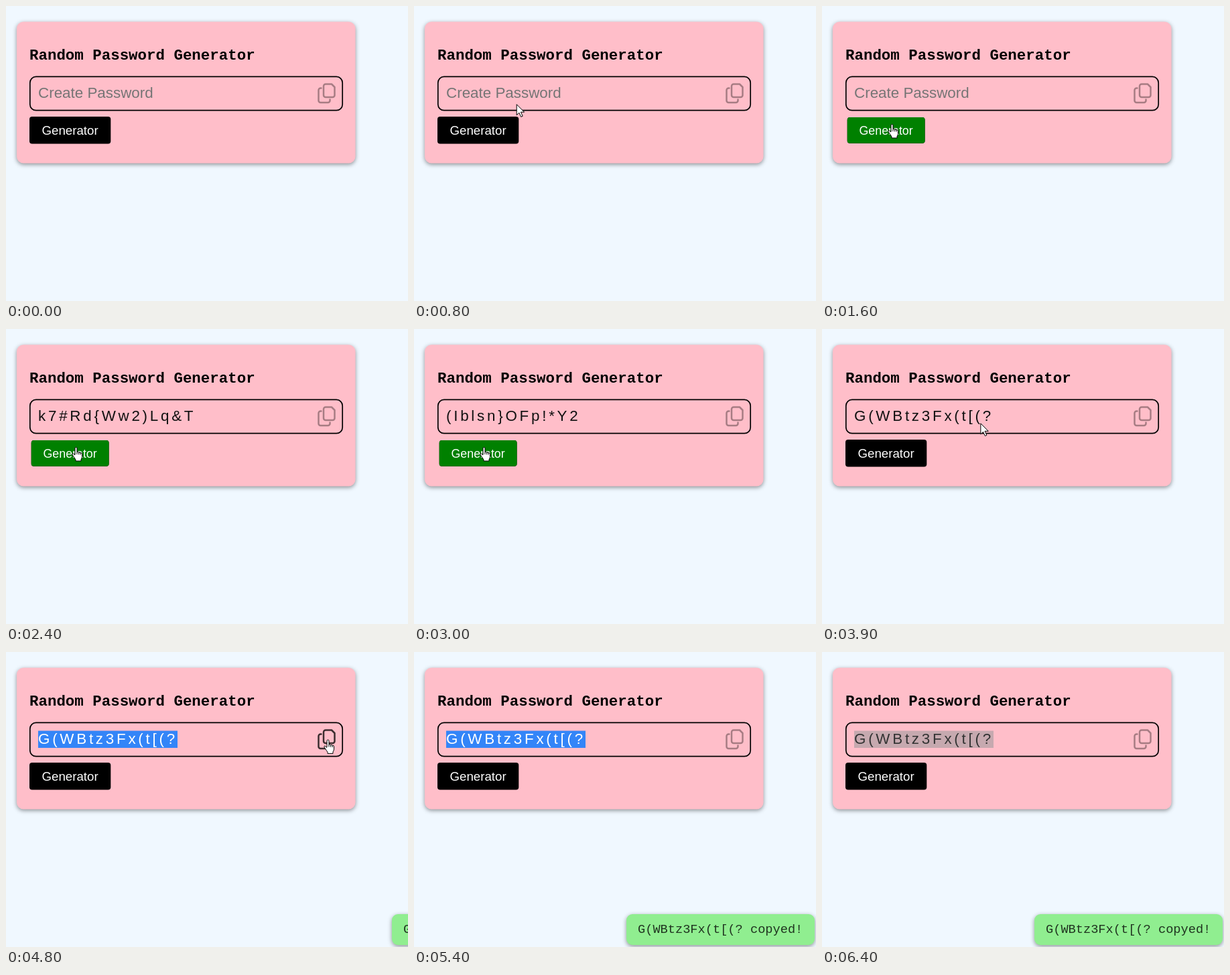
An HTML page that plays this animation: 600 by 440 pixels, repeating every 6500 ms.

```html
<!DOCTYPE html>
<html lang="en">
<head>
<meta charset="utf-8">
<title>Random Password Generator</title>
<style>
  html, body { margin: 0; width: 100%; height: 100%; overflow: hidden; background: #f0f8ff; }
  svg { display: block; width: 600px; height: 440px; }
  text { white-space: pre; }
  .mono { font-family: "Courier New", "Liberation Mono", monospace; }
  .sans { font-family: Arial, "Liberation Sans", sans-serif; }
  .card { filter: drop-shadow(0 2px 3px rgba(0, 0, 0, .42)); }
  .pen { fill: none; stroke: #000; stroke-width: 2.5; stroke-linejoin: round; stroke-linecap: round; }
  .cursor { fill: #fff; stroke: #000; stroke-width: 1; stroke-linejoin: round; }
  #field { font-size: 22.4px; }
</style>
</head>
<body>
<svg viewBox="0 0 600 440">
  <rect class="card" x="16" y="23.5" width="505.5" height="211" rx="10" fill="#ffbec9"/>
  <text class="mono" x="35" y="80" font-size="22.45" font-weight="700">Random Password Generator</text>

  <rect x="35.8" y="105.4" width="466.4" height="50.3" rx="9" fill="none" stroke="#000" stroke-width="1.7"/>
  <rect id="mark" x="48" y="117.5" width="208" height="25.5"/>
  <text id="field" class="sans" x="48" y="137.4"></text>

  <g id="copy" class="pen">
    <path d="M477 116.5h9l4.5 4.5v12a3 3 0 0 1-3 3h-10.5a3 3 0 0 1-3-3v-13.5a3 3 0 0 1 3-3z"/>
    <path d="M470.5 122.5h-1a3 3 0 0 0-3 3v15.5a3 3 0 0 0 3 3h11a3 3 0 0 0 3-3v-1.5"/>
  </g>

  <g id="button">
    <rect x="35" y="165" width="121.3" height="40.6" rx="4"/>
    <rect id="green" x="35" y="165" width="121.3" height="40.6" rx="4" fill="#008000"/>
    <text class="sans" x="53.6" y="192" font-size="18.67" fill="#fff">Generator</text>
  </g>

  <g id="toast">
    <rect class="card" x="317" y="391" width="281" height="46" rx="9" fill="#90ee90"/>
    <text class="mono" x="334" y="418.5" font-size="18.67" fill-opacity=".78">G(WBtz3Fx(t[(? copyed!</text>
  </g>

  <path id="arrow" class="cursor" d="M0 0v16l3.7-3.5 2.8 6.1 2.5-1.1-2.8-6h5.2z"/>
  <g id="hand" class="cursor">
    <path d="M-1.5 1.5a1.5 1.5 0 0 1 3 0V7q2.5-.8 2.7.6 2.3-.6 2.5.7 2.3-.4 2.3 1.6v4q0 2-1.5 4v2.5h-8v-2q-1-1.5-2-3l-3-4.5q-.5-1.6.8-1.8 1 0 2.2 2H-1.5z"/>
    <path fill="none" d="M1.5 7v3.5M4.2 7.6v3.2M6.7 8.3v2.8"/>
  </g>
</svg>
<script>
const LOOP = 6500, STEP = 100;
const CLICKS = [1600, 2400, 3000];
const WORDS = ["Create Password", "k7#Rd{Ww2)Lq&T", "(Iblsn}OFp!*Y2", "G(WBtz3Fx(t[(?"];

const ENTRY = [330, -24], ON_BUTTON = [104.5, 176.5], ON_COPY = [480.5, 131], EXIT = [590, 460];
const MOVES = [
  { start: 100, end: 1100, from: ENTRY, to: ON_BUTTON, lift: -20 },
  { start: 3540, end: 4440, from: ON_BUTTON, to: ON_COPY, lift: 21.5 },
  { start: 4900, end: 5450, from: ON_COPY, to: EXIT, lift: 0 }
];

const $ = id => document.getElementById(id);
const set = (id, attrs) => {
  for (const key in attrs) $(id).setAttribute(key, attrs[key]);
};
const show = on => on ? "visible" : "hidden";
const ramp = (t, start, end) => Math.min(1, Math.max(0, (t - start) / (end - start)));
const smooth = (t, start, end) => {
  const u = ramp(t, start, end);
  return u * u * (3 - 2 * u);
};
const pulse = (t, on, off, fade) => ramp(t, on, on + fade) - ramp(t, off, off + fade);

function pointerAt(t) {
  const { start, end, from, to, lift } = MOVES.filter(m => m.start <= t).pop() || MOVES[0];
  const s = smooth(t, start, end);
  const [x, y] = from.map((v, i) => v + (to[i] - v) * s);
  return [x, y - 4 * lift * s * (1 - s)];
}

function draw(t) {
  const [x, y] = pointerAt(t);
  const within = (l, top, r, b) => x > l && x < r && y > top && y < b;
  const onHand = within(35, 165, 156, 206) || within(463, 113, 494, 148);
  const shown = t >= 100 && t < 5400;
  const at = `translate(${x} ${y})`;
  set("arrow", { transform: at, visibility: show(shown && !onHand) });
  set("hand", { transform: at, visibility: show(shown && onHand) });

  const press = CLICKS.reduce((sum, c) => sum + pulse(t, c - 100, c + 100, 100), 0);
  set("button", {
    transform: `translate(95.7 185.5) scale(${1 - .045 * press}) translate(-95.7 -185.5)`
  });
  set("green", { opacity: pulse(t, 900, 3650, 200) });
  set("copy", { opacity: .34 + .42 * pulse(t, 4300, 4950, 200) });

  const made = CLICKS.filter(c => t >= c + 200).length;
  const selected = t >= 4700, blurred = t >= 6400;
  $("field").textContent = WORDS[made];
  $("field").style.letterSpacing = made ? "3.74px" : "0";
  set("field", { fill: !made ? "#757575" : blurred ? "#333" : selected ? "#fff" : "#111" });
  set("mark", { fill: blurred ? "#c6a9af" : "#3385f8", visibility: show(selected) });

  const slide = smooth(t, 4670, 5380);
  set("toast", { transform: `translate(${284 * (1 - slide)} 0)`, visibility: show(slide > 0) });
}

const start = performance.now();
function tick() {
  const t = (performance.now() - start) % LOOP;
  draw(Math.floor(t / STEP) * STEP);
  requestAnimationFrame(tick);
}
tick();
</script>
</body>
</html>
```
